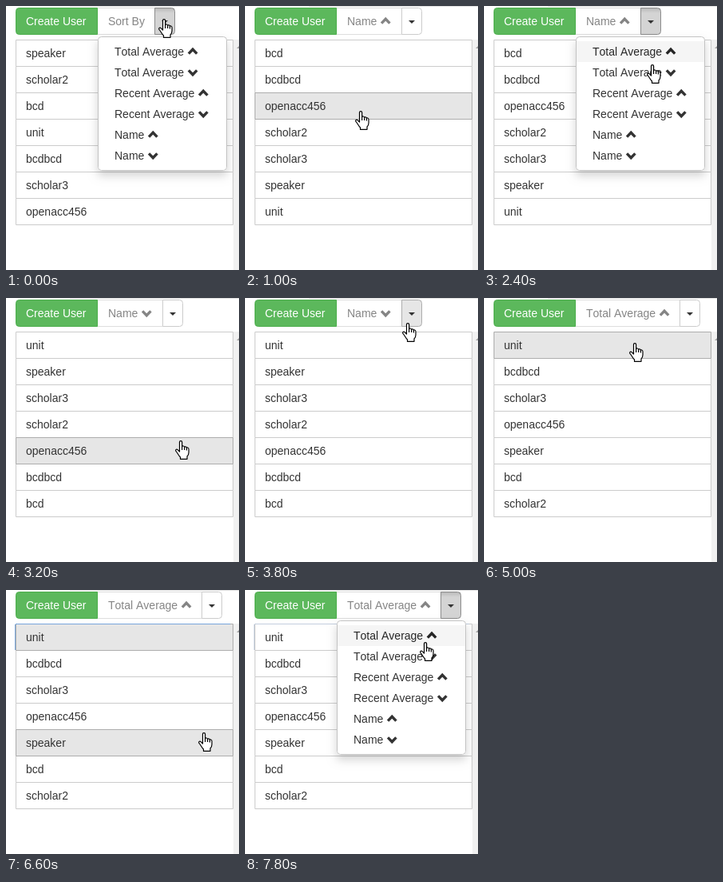
An HTML page with a canvas that plays this animation: 292x330 px, repeating every 8000 ms.

```html
<!DOCTYPE html>
<html lang="en">
<head>
<meta charset="utf-8">
<title>Sortable user list</title>
<style>
  html, body { margin: 0; width: 100%; height: 100%; overflow: hidden; background: #fff; }
  canvas { display: block; }
</style>
</head>
<body>
<canvas id="stage" width="292" height="330"></canvas>
<script>
const ctx = document.getElementById('stage').getContext('2d');
const STEP = 200, STEPS = 40;
const FONT = '14px "Liberation Sans", Arial, sans-serif';
const ROW_TOP = 42, ROW_PITCH = 33, ITEM_TOP = 44, ITEM_HEIGHT = 26;

const users = ['speaker', 'scholar2', 'bcd', 'unit', 'bcdbcd', 'scholar3', 'openacc456'];
const byAverage = ['unit', 'bcdbcd', 'scholar3', 'openacc456', 'speaker', 'bcd', 'scholar2'];
const byName = [...users].sort();
const menuItems = ['Total Average', 'Recent Average', 'Name']
  .flatMap(label => [{ label, arrow: -1 }, { label, arrow: 1 }]);

// The pointer eases from stop to stop and clicks when it leaves one.
const stop = (arrive, leave, x, y, click) => ({ arrive, leave, x, y, click });
const stops = [
  stop(0, 0, 191, 16, 'open'),
  stop(3, 4, 126, 152, 'pick'),
  stop(8, 10, 200, 16, 'open'),
  stop(15, 16, 212, 178, 'pick'),
  stop(19, 21, 197, 31, 'open'),
  stop(23, 25, 182, 56, 'pick'),
  stop(28, 30, 215, 60, 'focus'),
  stop(31, 32, 232, 139),
  stop(33, 33, 241, 178),
  stop(37, 38, 253, 29, 'open'),
  stop(39, STEPS, 219, 65, 'pick')
];

const smooth = k => k * k * (3 - 2 * k);
const tipOf = ({ x, y }) => ({ x: x + 7, y: y - 3.5 });
const itemAt = y => Math.floor((y - ITEM_TOP) / ITEM_HEIGHT);
const rowAt = y => Math.floor((y - ROW_TOP) / ROW_PITCH);

function handAt(step) {
  const next = stops.findIndex(s => step <= s.leave);
  const b = stops[next];
  if (step >= b.arrive) return b;
  const a = stops[next - 1];
  const k = smooth((step - a.leave) / (b.arrive - a.leave));
  return { x: Math.round(a.x + (b.x - a.x) * k), y: Math.round(a.y + (b.y - a.y) * k) };
}

function sorted({ label, arrow }) {
  const rows = label === 'Name' ? byName : byAverage;
  return arrow < 0 ? rows : [...rows].reverse();
}

// Replays every click made so far.
function stateAt(step) {
  const state = { choice: { label: 'Sort By', arrow: 0 }, rows: users, open: false, ring: false };
  for (const s of stops.filter(s => s.leave <= step)) {
    if (s.click === 'open') state.open = true;
    if (s.click === 'focus') state.ring = true;
    if (s.click === 'pick') {
      state.open = false;
      state.choice = menuItems[itemAt(tipOf(s).y)];
      state.rows = sorted(state.choice);
    }
  }
  return state;
}

function box(x, y, w, h, fill, stroke, radii = 0) {
  ctx.beginPath();
  ctx.roundRect(x + 0.5, y + 0.5, w - 1, h - 1, radii);
  ctx.fillStyle = fill;
  ctx.fill();
  ctx.strokeStyle = stroke;
  ctx.lineWidth = 1;
  ctx.stroke();
}

function rect(x, y, w, h, color) {
  ctx.fillStyle = color;
  ctx.fillRect(x, y, w, h);
}

function triangle(x, y, halfWidth, height, color) {
  ctx.beginPath();
  ctx.moveTo(x - halfWidth, y);
  ctx.lineTo(x + halfWidth, y);
  ctx.lineTo(x, y + height);
  ctx.fillStyle = color;
  ctx.fill();
}

function chevron(x, y, arrow, color) {
  ctx.beginPath();
  ctx.moveTo(x - 5.2, y - 3 * arrow);
  ctx.lineTo(x, y + 2.3 * arrow);
  ctx.lineTo(x + 5.2, y - 3 * arrow);
  ctx.strokeStyle = color;
  ctx.lineWidth = 3.4;
  ctx.stroke();
}

// Draws text with an optional chevron and returns the right edge.
function caption({ label, arrow }, x, baseline, color) {
  ctx.fillStyle = color;
  ctx.fillText(label, x, baseline);
  x += ctx.measureText(label).width;
  if (!arrow) return x;
  x += ctx.measureText(' ').width;
  chevron(x + 7, baseline - 5 + 0.4 * arrow, arrow, color);
  return x + 14;
}

function drawPage() {
  rect(0, 0, 292, 330, '#fff');
  rect(80, 0, 212, 1, '#e2e2e2');
  rect(285, 42, 7, 288, '#f1f1f1');
  triangle(292, 53, 3, -3, '#a3a3a3');
}

function drawToolbar({ choice, open }, tip) {
  const grey = '#858585';
  const caretX = Math.round(caption(choice, 128, 24, grey) + 12.3);
  const over = tip.x > caretX && tip.x < caretX + 26 && tip.y < 36;

  box(114, 2, caretX - 113, 34, '#fff', '#dedede');
  caption(choice, 128, 24, grey);
  box(12, 2, 103, 34, '#5cb85c', '#4cae4c', [4, 0, 0, 4]);
  caption({ label: 'Create User' }, 25, 24, '#fff');

  const [fill, edge] = open ? ['#d4d4d4', '#8c8c8c'] : over ? ['#e6e6e6', '#adadad'] : ['#fff', '#ccc'];
  box(caretX, 2, 26, 34, fill, edge, [0, 4, 4, 0]);
  if (open) {
    const shade = ctx.createLinearGradient(0, 3, 0, 9);
    shade.addColorStop(0, 'rgba(0,0,0,.12)');
    shade.addColorStop(1, 'rgba(0,0,0,0)');
    rect(caretX + 1, 3, 24, 6, shade);
  }
  triangle(caretX + 13, 18, 4, 4, '#333');
}

function drawRow(name, i, active) {
  const y = ROW_TOP + i * ROW_PITCH;
  box(12, y, 273, 34, active ? '#e6e6e6' : '#fff', active ? '#adadad' : '#ccc');
  caption({ label: name }, 25, y + 22, '#333');
}

function drawList({ rows, open, ring }, tip) {
  const active = i => !open && (i === rowAt(tip.y) || (ring && i === 0));
  rows.forEach((name, i) => active(i) || drawRow(name, i, false));
  rows.forEach((name, i) => active(i) && drawRow(name, i, true));
  if (ring) {
    const color = open ? '#c3cede' : '#78a6dc';
    rect(12, ROW_TOP, 269, 1, color);
    rect(11, ROW_TOP + 1, 1, 32, color);
  }
}

function drawMenu(tip) {
  ctx.save();
  ctx.shadowColor = 'rgba(0,0,0,.175)';
  ctx.shadowBlur = 12;
  ctx.shadowOffsetY = 6;
  ctx.beginPath();
  ctx.roundRect(115, 38, 162, 168, 4);
  ctx.fillStyle = '#fff';
  ctx.fill();
  ctx.restore();
  box(115, 38, 162, 168, '#fff', '#c4c4c4', 4);
  menuItems.forEach((item, i) => {
    const y = ITEM_TOP + i * ITEM_HEIGHT;
    const hovered = i === itemAt(tip.y);
    if (hovered) rect(116, y, 160, ITEM_HEIGHT, '#f5f5f5');
    caption(item, 136, y + 18, hovered ? '#262626' : '#333');
  });
}

const handShape = new Path2D(
  'M5.5 14V2Q5.5 .6 7 .6Q8.6 .6 8.6 2V8Q8.6 6.8 10.2 7Q11.6 7.2 11.6 8.6' +
  'Q11.8 7.6 13 7.8Q14.3 8 14.4 9.4Q14.6 8.7 15.7 9Q17 9.4 17 11V15Q17 18 15 20' +
  'V23.3H6.5V21Q5 19.5 3.5 17Q2.2 14.8 .9 13.4Q.2 11.8 1.6 11.2Q2.8 11 4 12.5Z');
const knuckles = new Path2D('M8.6 8V12M11.6 8.6V12M14.4 9.4V12.4');

function drawHand({ x, y }) {
  ctx.save();
  ctx.translate(x, y);
  ctx.lineJoin = 'round';
  ctx.lineWidth = 1.2;
  ctx.strokeStyle = '#000';
  ctx.fillStyle = '#fff';
  ctx.fill(handShape);
  ctx.stroke(handShape);
  ctx.stroke(knuckles);
  ctx.restore();
}

function draw(step) {
  const state = stateAt(step);
  const hand = handAt(step);
  const tip = tipOf(hand);
  drawPage();
  drawToolbar(state, tip);
  drawList(state, tip);
  if (state.open) drawMenu(tip);
  drawHand(hand);
}

function tick() {
  draw(Math.floor(performance.now() / STEP) % STEPS);
  requestAnimationFrame(tick);
}

ctx.font = FONT;
ctx.fontKerning = 'none';
tick();
</script>
</body>
</html>
```
